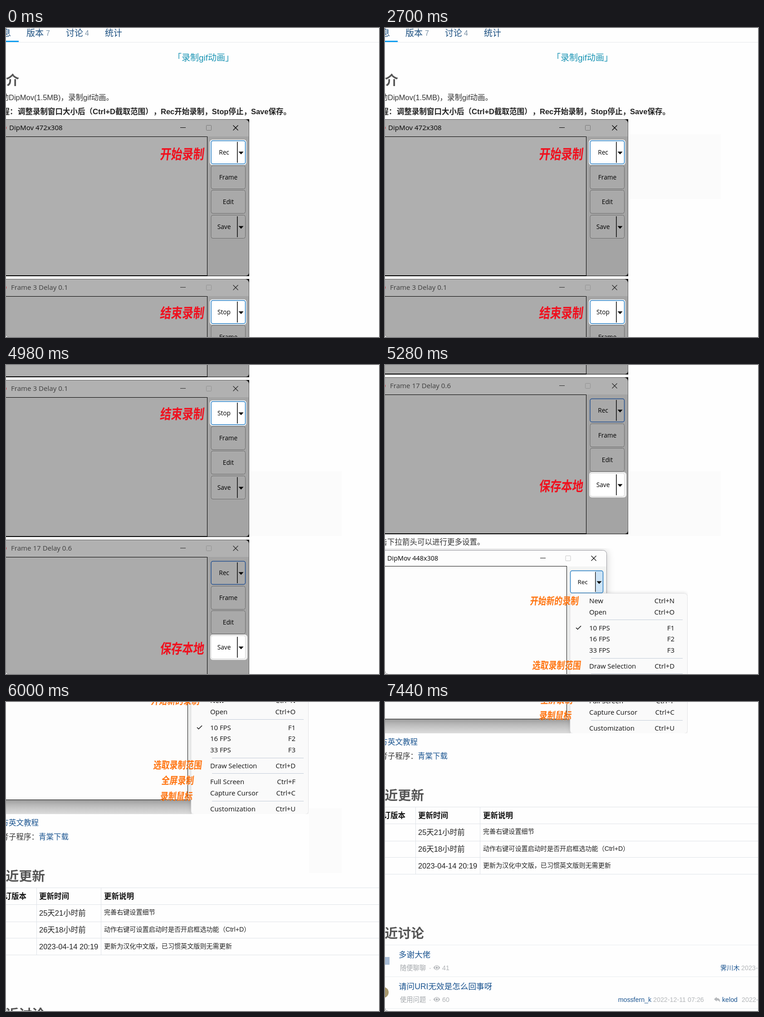
Recreate the animation shown at these times as an HTML page with a canvas. Size 822 by 681 pixels, loop 7560 ms.

```html
<!DOCTYPE html>
<html lang="zh-CN">
<head>
<meta charset="utf-8">
<title>录制gif动画</title>
<style>
html, body { margin: 0; width: 100%; height: 100%; overflow: hidden; background: #fff; }
canvas { display: block; width: 822px; height: 681px; }
</style>
</head>
<body>
<canvas id="stage"></canvas>
<script>
const W = 822, H = 681, LOOP = 7560, TICK = 60;
const BODY = '"Liberation Sans", "Noto Sans CJK SC", "Noto Sans CJK", sans-serif';
const UI = '"Open Sans", "Noto Sans", sans-serif';
const HAND = '"Noto Sans CJK SC", "Noto Sans CJK", sans-serif';
const INK = '#333', LINK = '#1a5490', GREY = '#a3a7ab', RULE = '#dfe3e8';

const canvas = document.getElementById('stage');
const dpr = window.devicePixelRatio || 1;
canvas.width = W * dpr;
canvas.height = H * dpr;
const c = canvas.getContext('2d');

// y is the optical middle of the line
function text(s, x, y, size, color = INK, { family = BODY, style = '', align = 'left' } = {}) {
  c.font = `${style} ${size}px ${family}`;
  c.textAlign = align;
  c.fillStyle = color;
  c.fillText(s, x, y + size * 0.36);
}
const bold = (s, x, y, size, color, align) => text(s, x, y, size, color, { style: 'bold', align });
const ui = (s, x, y, size, color, align, style) => text(s, x, y, size, color, { family: UI, align, style });

// condensed, slightly slanted marker lettering
function hand(s, x, y, size, color) {
  c.save();
  c.translate(x, y);
  c.transform(0.8, 0, -0.12, 1, 0, 0);
  text(s, 0, 0, size, color, { family: HAND, style: 'bold' });
  c.restore();
}

function rect(x, y, w, h, color) {
  c.fillStyle = color;
  c.fillRect(x, y, w, h);
}

function round(x, y, w, h, r, fill, stroke, width = 1) {
  c.beginPath();
  c.roundRect(x, y, w, h, r);
  if (fill) { c.fillStyle = fill; c.fill(); }
  if (stroke) { c.strokeStyle = stroke; c.lineWidth = width; c.stroke(); }
}

function disc(x, y, r, color) {
  c.beginPath();
  c.arc(x, y, r, 0, 7);
  c.fillStyle = color;
  c.fill();
}

function path(points, color, width) {
  c.beginPath();
  points.forEach(([x, y]) => c.lineTo(x, y));
  c.strokeStyle = color;
  c.lineWidth = width;
  c.stroke();
}

function arrow(x, y) {
  c.beginPath();
  c.moveTo(x - 5.5, y - 2.5);
  c.lineTo(x + 5.5, y - 2.5);
  c.lineTo(x, y + 3.5);
  c.fillStyle = '#000';
  c.fill();
}

function controls(y, min, max, close, ink, dim) {
  rect(min - 6, y - 1, 12, 1, ink);
  round(max - 5.5, y - 5.5, 11, 11, 1, null, dim);
  path([[close - 5.5, y - 5.5], [close + 5.5, y + 5.5]], ink, 1.3);
  path([[close + 5.5, y - 5.5], [close - 5.5, y + 5.5]], ink, 1.3);
}

function button(label, y, split, look) {
  const box = (fill, stroke, width) => round(452, y - 25.5, 75.5, 51, 4, fill, stroke, width);
  if (look === 'focus') {
    round(449, y - 28, 81, 56, 6, '#f4f8fb');
    box('#fff', '#1f78c0', 1.5);
  } else if (look === 'lit') {
    round(450, y - 28, 82, 56, 6, '#f1f1f1');
    box('#fff', '#d4d4d4');
  } else if (look === 'ring') {
    box('#a9a9a9', '#24508f', 1.5);
  } else {
    box('#a9a9a9', '#6c6c6c');
  }
  ui(label, split ? 480.5 : 490, y, 13.7, '#000', 'center', '500');
  if (split) {
    rect(509, y - 23, 1.6, 46, '#111');
    arrow(518, y + 1);
  }
}

function recorder(top, title, titleX, first, looks, note, noteY) {
  const active = titleX < 10;
  rect(-10, top, 546, 346, '#111');
  round(-20, top + 0.5, 555.5, 344.5, [0, 9, 7, 0], '#a4a4a4', '#5c5c5c');
  round(-20, top + 1, 555, 37, [0, 8, 0, 0], '#b1b1b1');
  rect(-10, top + 38, 454, 308, '#000');
  rect(-10, top + 39, 453, 305, active ? '#afafaf' : '#ababab');
  disc(-4, top + 19, 5, '#d0202c');
  ui(title, titleX, top + 19, 15.1, active ? '#000' : '#3e3e3e');
  controls(top + 19, 390, 447, 506, active ? '#000' : '#2c2c2c', active ? '#777' : '#929292');
  [first, 'Frame', 'Edit', 'Save'].forEach((label, i) =>
    button(label, top + 73 + Math.round(i * 54.6), i % 3 === 0, looks[i]));
  hand(note, 340, top + noteY, 30.4, '#f0101e');
}

function menu() {
  const left = 408, top = 1381;
  c.save();
  c.shadowColor = 'rgba(0,0,0,.14)';
  c.shadowBlur = 8 * dpr;
  round(left, top, 258.5, 267, 7, '#fafafa');
  c.restore();
  round(left, top + 0.5, 258.5, 267, 7, '#fafafa', '#e4e4e6');
  [['New', 'Ctrl+N', 1397.5], ['Open', 'Ctrl+O', 1422.5],
   ['10 FPS', 'F1', 1457.5], ['16 FPS', 'F2', 1482], ['33 FPS', 'F3', 1507],
   ['Draw Selection', 'Ctrl+D', 1542], ['Full Screen', 'Ctrl+F', 1577],
   ['Capture Cursor', 'Ctrl+C', 1602], ['Customization', 'Ctrl+U', 1637]
  ].forEach(([name, key, y]) => {
    ui(name, 450, y, 14.9, '#111');
    ui(key, 638, y, 14.9, '#111', 'right');
  });
  [1439, 1524, 1558, 1619].forEach(y => rect(454, y, 202, 1, '#c3ccd8'));
  path([[421, 1457], [424.5, 1460.5], [432, 1453]], '#111', 1.5);
}

function settings() {
  const top = 1286;
  c.save();
  c.beginPath();
  c.rect(-10, top - 4, 677, 366);
  c.clip();
  const shade = c.createLinearGradient(0, 1616, 0, 1648);
  shade.addColorStop(0, '#a9a9a9');
  shade.addColorStop(1, '#dcdcdc');
  rect(-10, 1617, 419, 31, shade);
  c.shadowColor = 'rgba(0,0,0,.2)';
  c.shadowBlur = 18 * dpr;
  round(-20, top + 0.5, 508.5, 330, [0, 8, 0, 0], '#fff');
  c.shadowColor = 'transparent';
  round(-20, top + 0.5, 508.5, 330, [0, 8, 0, 0], '#fdfdfd', '#9a9aa0');
  rect(401, top + 36, 87, 294, '#f3f4f3');
  rect(-10, top + 35, 411, 296, '#111');
  rect(-10, top + 36, 410, 294, '#fdfdfd');
  ui('DipMov 448x308', 5, top + 18, 14.4, '#000');
  controls(top + 18, 348, 403.5, 460, '#111', '#c8c8c8');
  round(408.5, 1331.5, 72, 49, 4, '#fff');
  round(464, 1332, 16, 48, [0, 4, 4, 0], '#cde4f6');
  round(408.5, 1331.5, 72, 49, 4, null, '#1f78c0', 1.4);
  rect(463, 1334, 1.3, 44, '#111');
  arrow(472, 1357);
  ui('Rec', 435.5, 1356, 13.4, '#000', 'center', '500');
  menu();
  [['开始新的录制', 320, 1398], ['选取录制范围', 325, 1540],
   ['全屏录制', 343, 1574], ['录制鼠标', 340, 1609]
  ].forEach(([s, x, y]) => hand(s, x, y, 22.3, '#ff7410'));
  c.restore();
}

function header() {
  const blue = '#1b4f80', pale = '#7b93a8';
  text('信息', -27, 11, 19, blue);
  text('版本', 45, 11, 19, blue);
  text('7', 88, 11.5, 16, pale);
  text('讨论', 132, 11, 19, blue);
  text('4', 174, 11.5, 16, pale);
  text('统计', 218, 11, 19, blue);
  rect(0, 31, W, 1, '#e6e9ec');
  rect(0, 28, 28, 3, '#129ff0');
  text('「录制gif动画」', 368, 65, 19, '#1893b3');
  bold('简介', 29, 115.5, 29, '#555', 'right');
  text('启动DipMov(1.5MB)，录制gif动画。', -27, 153.5, 16.5);
  bold('程：', -8.5, 184, 16.5, '#222');
  // split so that the bracket and the comma both keep their full width
  bold('调整录制窗口大小后（Ctrl+D截取范围）', 26, 184, 16.5, '#222');
  bold('，Rec开始录制，Stop停止，Save保存。', 324.5, 184, 16.5, '#222');
}

function updates() {
  text('官方英文教程', -27, 1667.5, 16.5, LINK);
  text('参考子程序：', -27, 1698, 16.5);
  text('青棠下载', 72, 1698, 16.5, LINK);
  bold('最近更新', 86, 1785, 28.8, '#555', 'right');
  [1810, 1847, 1885, 1921, 1958].forEach(y => rect(0, y, W, 1, RULE));
  [67, 209].forEach(x => rect(x, 1810, 1, 149, RULE));
  bold('修订版本', 45, 1829, 16.5, '#111', 'right');
  bold('更新时间', 73, 1829, 16.5, '#111');
  bold('更新说明', 216, 1829, 16.5, '#111');
  [['25天21小时前', '完善右键设置细节', 1866],
   ['26天18小时前', '动作右键可设置启动时是否开启框选功能（Ctrl+D）', 1903.5],
   ['2023-04-14 20:19', '更新为汉化中文版，已习惯英文版则无需更新', 1940.5]
  ].forEach(([when, what, y]) => {
    text(when, 73, y, 16.5, '#222');
    text(what, 216, y - 2, 14.1, '#222');
  });
}

function eye(x, y) {
  c.beginPath();
  c.moveTo(x - 7.5, y);
  c.quadraticCurveTo(x, y - 10.5, x + 7.5, y);
  c.quadraticCurveTo(x, y + 10.5, x - 7.5, y);
  c.fillStyle = '#b5b8bb';
  c.fill();
  disc(x, y, 4, '#fff');
  disc(x, y, 2.5, '#b5b8bb');
}

function reply(x, y) {
  c.beginPath();
  c.moveTo(x, y - 1);
  c.lineTo(x + 6, y - 6);
  c.lineTo(x + 6, y - 3.5);
  c.quadraticCurveTo(x + 15, y - 3, x + 12.5, y + 6);
  c.quadraticCurveTo(x + 12, y + 1.5, x + 6, y + 1.5);
  c.lineTo(x + 6, y + 4);
  c.fillStyle = '#b5b8bb';
  c.fill();
}

function topic(y, title, board, views) {
  text(title, 30, y, 17.6, LINK);
  text(board, 33, y + 29, 14.3, GREY);
  text('·', 97, y + 29, 14.3, GREY);
  eye(114, y + 28.5);
  text(views, 126, y + 29, 14.3, '#b0b3b6');
}

function topics() {
  const date = '#b4b7ba';
  bold('最近讨论', 86, 2089, 28.8, '#555', 'right');
  [2114, 2184, 2254].forEach(y => rect(0, y, W, 1, '#e9ecef'));
  rect(0, 2141, 10, 17, '#a9bdd6');
  disc(-4, 2219, 12, '#a8996f');
  topic(2136, '多谢大佬', '随便聊聊', '41');
  topic(2206, '请问URI无效是怎么回事呀', '使用问题', '60');
  text('霁川木', 739, 2165, 14.2, LINK);
  text('2023-04-02', 785, 2165, 14.3, date);
  text('mossfern_k', 587, 2235, 14.2, LINK, { align: 'right' });
  text('2022-12-11 07:26', 591, 2235, 14.3, date);
  reply(725, 2235);
  text('kelod', 743, 2235, 14.2, LINK);
  text('2022-12-11', 786, 2235, 14.3, date);
}

const easeOut = (u, power) => 1 - Math.pow(1 - Math.min(u, 1), power);

function scrollAt(t) {
  if (t < 4800) return 0;
  if (t < 5640) return Math.round(878 * easeOut((t - 4740) / 540, 1.525));
  return Math.round(878 + 701 * easeOut((t - 5580) / 900, 2.18));
}

// faint panel left standing on the screen while the page moves beneath
function haze(t) {
  if (t < 2340 || t >= 6480) return;
  const left = t < 5640 ? 540 : 668;
  c.globalAlpha = Math.min(1, (t - 2280) / 420);
  rect(left, 234, 740 - left, 143, '#fbfbfb');
  c.globalAlpha = 1;
}

function corner() {
  c.beginPath();
  c.moveTo(0, H - 6);
  c.quadraticCurveTo(0.5, H - 0.5, 6, H);
  c.lineTo(0, H);
  c.fillStyle = '#f4f4f4';
  c.fill();
  c.beginPath();
  c.moveTo(0, H - 6);
  c.quadraticCurveTo(0.5, H - 0.5, 6, H);
  c.strokeStyle = '#8c8c8c';
  c.lineWidth = 1;
  c.stroke();
}

function draw(now) {
  const t = Math.floor((now % LOOP) / TICK) * TICK;
  c.setTransform(dpr, 0, 0, dpr, 0, 0);
  rect(0, 0, W, H, '#fefefe');
  haze(t);
  c.save();
  c.translate(0, -scrollAt(t));
  header();
  recorder(201, 'DipMov 472x308', 7, 'Rec', ['focus'], '开始录制', 77);
  recorder(553, 'Frame 3 Delay 0.1', 11, 'Stop', ['focus'], '结束录制', 75);
  recorder(905, 'Frame 17 Delay 0.6', 11, 'Rec', ['ring', '', '', 'lit'], '保存本地', 240);
  text('点击下拉箭头可以进行更多设置。', -28, 1268, 16.5);
  settings();
  updates();
  topics();
  c.restore();
  corner();
}

const start = performance.now();
function loop() {
  draw(performance.now() - start);
  requestAnimationFrame(loop);
}
loop();
</script>
</body>
</html>
```
